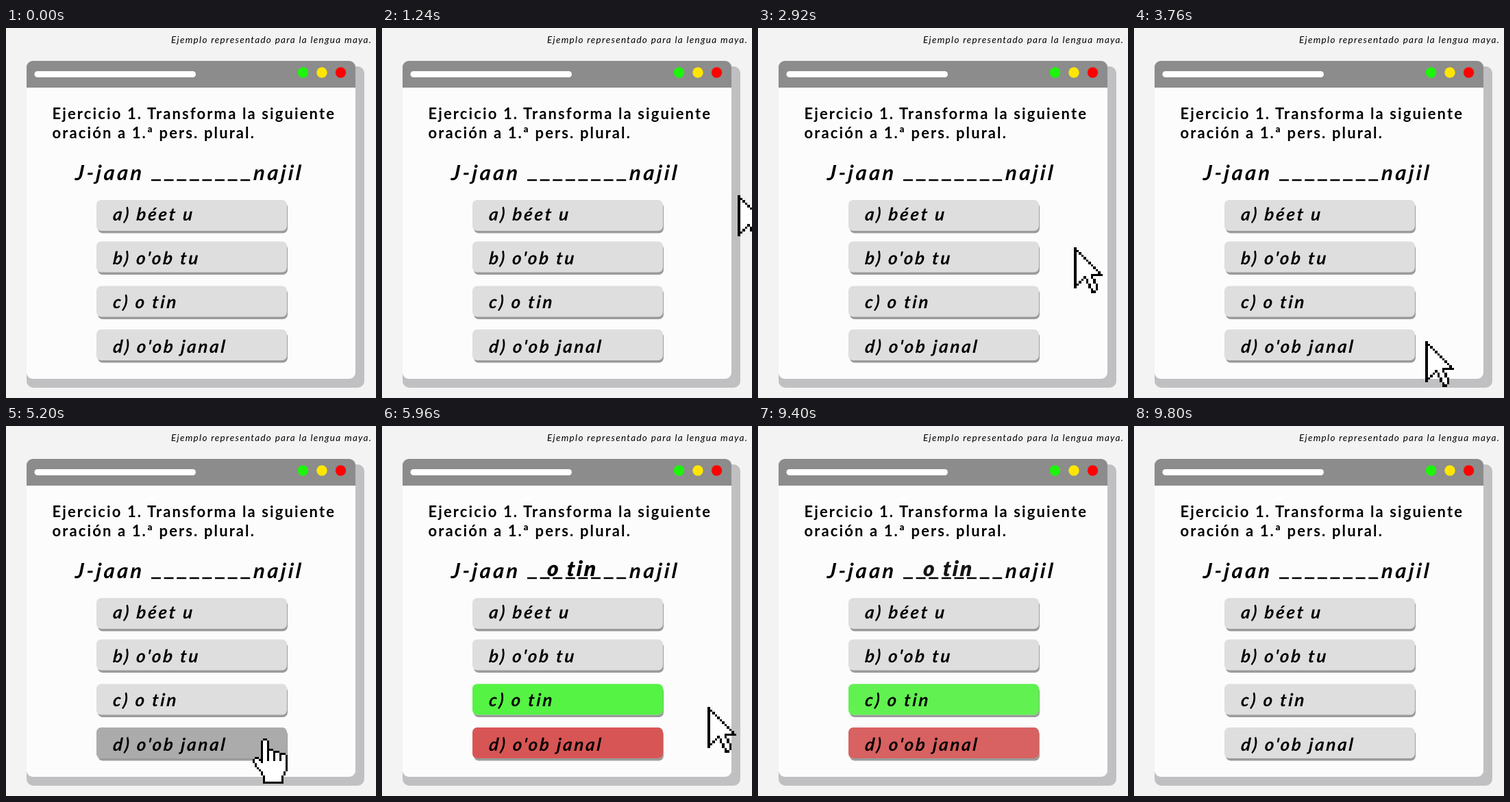
Animation, 540 px wide and 540 px high, one loop 10000 ms. Source, as an HTML page:

```html
<!DOCTYPE html>
<html lang="es">
<head>
<meta charset="utf-8">
<title>Ejercicio 1</title>
<style>
  html, body { margin: 0; width: 100%; height: 100%; overflow: hidden; background: #f3f3f3; }
  svg { display: block; width: 100vw; height: 100vh; }
  text { font-family: Lato, "Open Sans", sans-serif; fill: #000; }
  .note { font-size: 13.5px; font-style: italic; letter-spacing: 1.3px; }
  .task { font-size: 22px; font-weight: 700; letter-spacing: 2.12px; }
  .slanted {
    font-style: italic; font-weight: 700;
    transform: skewX(-5deg); transform-box: fill-box; transform-origin: left bottom;
  }
  .phrase { font-size: 30.5px; letter-spacing: 3.6px; }
  .answer { font-size: 31px; font-weight: 900; letter-spacing: 2.8px; }
  .option { font-size: 26px; letter-spacing: 2.7px; }
</style>
</head>
<body>
<svg viewBox="0 0 540 540">
  <rect width="540" height="540" fill="#f3f3f3"/>
  <text class="note" x="241" y="21.5">Ejemplo representado para la lengua maya.</text>

  <rect x="30" y="56" width="493" height="469" rx="10" fill="#c0c0c3"/>
  <rect x="30" y="48" width="480" height="464" rx="9" fill="#fcfcfc"/>
  <path d="M30 87V57a9 9 0 0 1 9-9H501a9 9 0 0 1 9 9V87z" fill="#8c8c8c"/>
  <rect x="41.5" y="63" width="235.5" height="9" rx="4.5" fill="#fff"/>
  <circle cx="433.5" cy="65" r="7.7" fill="#1cf50b"/>
  <circle cx="461" cy="65" r="7.7" fill="#ffe600"/>
  <circle cx="488.5" cy="65" r="7.7" fill="#f00"/>

  <text class="task" x="67.5" y="132.5">Ejercicio 1. Transforma la siguiente</text>
  <text class="task" x="67.5" y="160.5">oración a 1.ª pers. plural.</text>

  <text class="slanted phrase" x="100" y="222">J-jaan</text>
  <path d="M212 222H357" stroke="#000" stroke-width="2.6" stroke-dasharray="14 4.6"/>
  <text class="slanted phrase" x="360" y="222">najil</text>
  <text class="slanted answer" id="answer" x="240" y="219">o tin</text>

  <g id="options"></g>
  <g id="arrow" shape-rendering="crispEdges"></g>
  <g id="hand" shape-rendering="crispEdges"></g>
</svg>
<script>
const LOOP = 10000, STEP = 40;
const $ = id => document.getElementById(id);

function add(parent, tag, attrs, text = '') {
  const el = document.createElementNS('http://www.w3.org/2000/svg', tag);
  for (const key in attrs) el.setAttribute(key, attrs[key]);
  el.textContent = text;
  return parent.appendChild(el);
}

const box = (y, fill, dx = 0, dy = 0) => add($('options'), 'rect',
  { x: 132 + dx, y: y + dy, width: 278 - dx / 2, height: 45, rx: 7, fill });

// Answer buttons: label and top edge
const overlays = {};
[['a) béet u', 251], ["b) o'ob tu", 311.5], ['c) o tin', 376.5], ["d) o'ob janal", 440]]
  .forEach(([label, top], i) => {
    box(top, '#9b9b9b', 2, 3.5);
    box(top, '#dedede');
    if (i === 2) overlays.right = box(top, '#55f344');
    if (i === 3) {
      overlays.hover = box(top, '#ababab');
      overlays.wrong = box(top, '#d85555');
    }
    add($('options'), 'text', { class: 'slanted option', x: 155, y: 281 + 64.2 * i }, label);
  });

// Unit squares along a polyline, for the stepped cursor outlines
function squares(points) {
  let d = '';
  for (let i = 1; i < points.length; i++) {
    const [x0, y0] = points[i - 1], [x1, y1] = points[i];
    const n = Math.max(Math.abs(x1 - x0), Math.abs(y1 - y0));
    for (let k = 0; k <= n; k++) {
      const x = Math.round(x0 + (x1 - x0) * k / (n || 1));
      const y = Math.round(y0 + (y1 - y0) * k / (n || 1));
      d += `M${x} ${y}h1v1h-1z`;
    }
  }
  return d;
}

function drawCursor(group, cell, outline, inner = []) {
  const g = add(group, 'g', { transform: `scale(${cell})` });
  const middle = outline.map(([x, y]) => `${x + .5},${y + .5}`).join(' ');
  add(g, 'polygon', { points: middle, fill: '#fff' });
  const lines = [[...outline, outline[0]], ...inner];
  add(g, 'path', { d: lines.map(squares).join(''), fill: '#000' });
}

drawCursor($('arrow'), 3.5, [
  [0, 0], [11, 11], [7, 11], [7, 12], [9, 16], [9, 17], [8, 18], [7, 18], [4, 12], [0, 16]
]);

// Four fingers side by side, the first one raised
const fingers = [], gaps = [];
for (let i = 0; i < 4; i++) {
  const x = 5 + 3 * i, top = i ? 4 + i : 0;
  fingers.push([x, top], [x + 1, top], [x + 2, top + 1], [x + 2, 5 + i]);
  if (i < 3) gaps.push([[x + 2, 5 + i], [x + 2, 10]]);
}
const palm = [[16, 14], [14, 18], [14, 21], [5, 21], [5, 18]];
const thumb = [[0, 11], [0, 10], [1, 9], [2, 9], [4, 11], [4, 1]];
drawCursor($('hand'), 3, [...fingers, ...palm, ...thumb], gaps);

// Pointer tip: time, x, y
const track = [
  [680, 542, 248], [2120, 484, 238], [2760, 468, 294], [3760, 425, 457],
  [4600, 376, 456], [5200, 376, 456], [5960, 475, 410], [7280, 531, 316]
];

function tipAt(t) {
  const i = track.findIndex(p => p[0] > t);
  if (i < 1) return null;
  const [t0, x0, y0] = track[i - 1], [t1, x1, y1] = track[i];
  const k = (t - t0) / (t1 - t0);
  return [Math.round(x0 + (x1 - x0) * k), Math.round(y0 + (y1 - y0) * k)];
}

const ramp = (t, from, to) => Math.min(1, Math.max(0, (t - from) / (to - from)));

function place(el, shown, x, y) {
  el.style.display = shown ? '' : 'none';
  if (shown) el.setAttribute('transform', `translate(${x} ${y})`);
}

function render(t) {
  const result = ramp(t, 5200, 5560) * (1 - ramp(t, 9360, 9800));
  $('answer').style.opacity = result;
  overlays.right.style.opacity = result;
  overlays.wrong.style.opacity = result;
  overlays.hover.style.opacity = t < 5600 ? ramp(t, 3920, 4160) : 0;

  const tip = tipAt(t);
  const [x, y] = tip || [0, 0];
  const onButton = x < 410;
  place($('arrow'), tip && !onButton, x, y);
  place($('hand'), tip && onButton, x - 16, y);
}

const start = performance.now();
function tick() {
  const t = (performance.now() - start) % LOOP;
  render(Math.floor(t / STEP) * STEP);
  requestAnimationFrame(tick);
}
tick();
</script>
</body>
</html>
```
